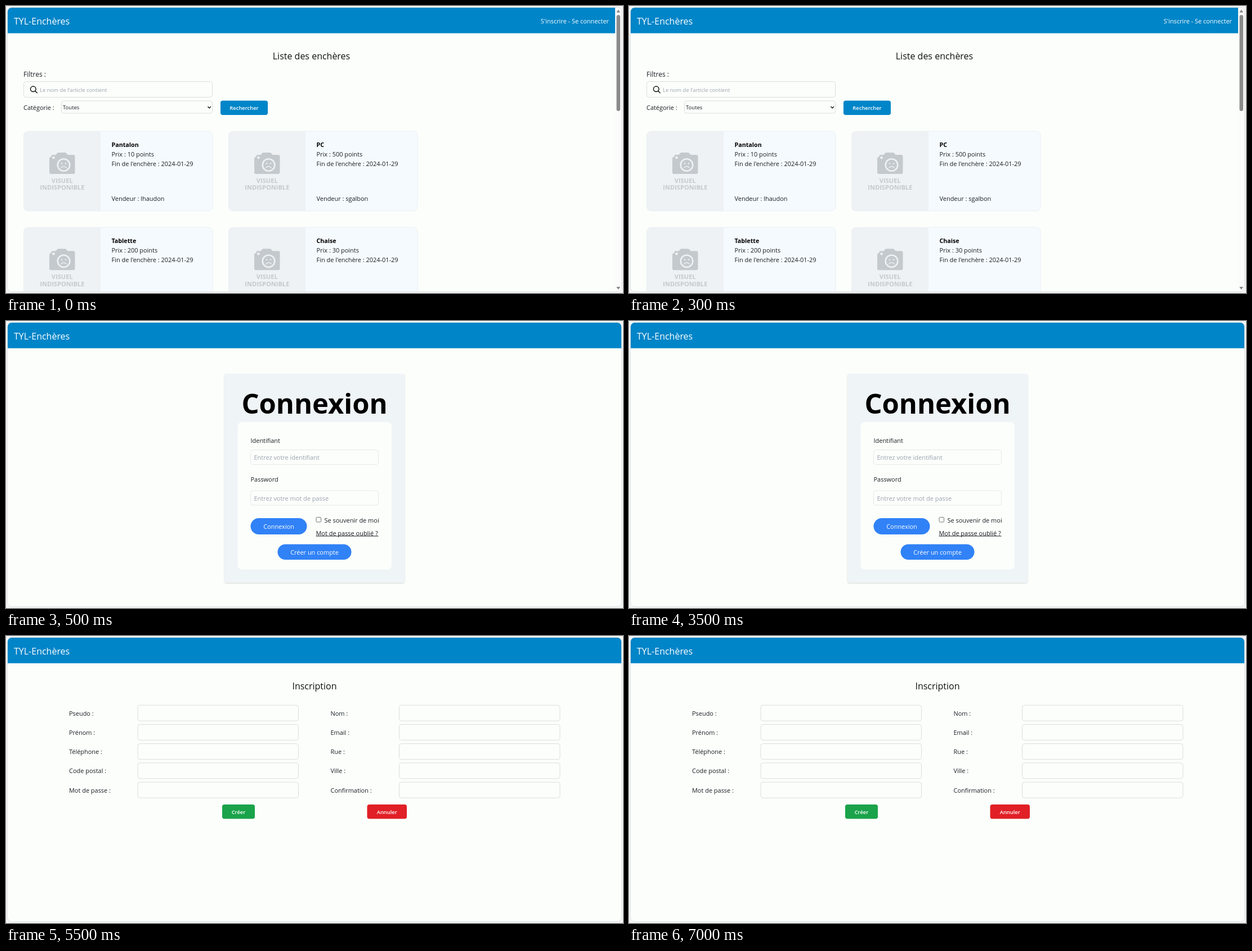
An HTML page that plays this animation: 1096 by 511 pixels, repeating every 8000 ms.

```html
<!DOCTYPE html>
<html lang="fr">
<head>
<meta charset="utf-8">
<title>Enchères</title>
<style>
  html, body { margin: 0; width: 100%; height: 100%; overflow: hidden; background: #f4f5f5; }
  svg { display: block; width: 1096px; height: 511px; }
  text { font-family: "Open Sans", "Noto Sans", sans-serif; font-size: 10.95px; fill: #1b1f24; white-space: pre; }
  .h { font-size: 16px; fill: #111; }
  .b { font-weight: 700; font-size: 10.7px; fill: #000; }
  .s { font-size: 9.5px; }
  .hint { fill: #9ca3af; }
  .btn { font-size: 9.4px; font-weight: 600; fill: #fff; }
  .w { fill: #fff; }
  .mid { text-anchor: middle; }
  .big { font-size: 48.9px; font-weight: 700; fill: #000; }
  .none { font-size: 11.1px; font-weight: 700; fill: #c4c9cd; }
</style>
</head>
<body>
<svg viewBox="0 0 1096 511">
  <defs>
    <clipPath id="win"><rect x="3" y="3" width="1090" height="505" rx="7"/></clipPath>
    <filter id="soft" x="-5%" y="-5%" width="110%" height="110%">
      <feDropShadow dx="0" dy="1" stdDeviation="1" flood-opacity=".16"/>
    </filter>
    <g id="camera">
      <path d="M49 45.500V44q0-2 2-2h6l2.500-3q1-1 2.500-1h11q1.500 0 2.500 1l2.500 3h10q3 0 3 3v28q0 3-3 3H48.500q-3 0-3-3V48.500q0-3 3.500-3z" fill="#c4c9cd"/>
      <circle cx="53" cy="47" r="2.300" fill="#eef2f5"/>
      <circle cx="71" cy="60" r="10.800" fill="#c4c9cd" stroke="#eef2f5" stroke-width="2.600"/>
      <g fill="#eef2f5">
        <circle cx="67.500" cy="57.500" r="1.300"/>
        <circle cx="74.500" cy="57.500" r="1.300"/>
      </g>
      <path d="M66.500 65q4.500-5 9 0" fill="none" stroke="#eef2f5" stroke-width="1.500" stroke-linecap="round"/>
    </g>
  </defs>
  <rect x="2.500" y="2.500" width="1091" height="506" rx="7.500" fill="#fbfefb" stroke="#e0e3e3"/>
  <g clip-path="url(#win)">
    <rect id="bar" x="3" y="3" width="1090" height="45.500" fill="#0085c8"/>
    <text x="14" y="32.500" class="h w" style="fill:#fff">TYL-Enchères</text>
    <g id="list"></g>
    <g id="login"></g>
    <g id="signup"></g>
  </g>
</svg>
<script>
const byId = id => document.getElementById(id);
const text = (x, y, str, cls = "") => `<text x="${x}" y="${y}" class="${cls}">${str}</text>`;
const box = (x, y, w, h, r, fill, more = "") =>
  `<rect x="${x}" y="${y}" width="${w}" height="${h}" rx="${r}" fill="${fill}" ${more}/>`;
const field = (x, y, w, h, line = "#d9dfe0") => box(x, y, w, h, 4, "#fbfefb", `stroke="${line}"`);
const button = (x, y, w, h, r, fill, label, base, cls) =>
  box(x, y, w, h, r, fill) + text(x + w / 2, base, label, cls + " mid");

function card(x, y, name, price, seller) {
  return `<g transform="translate(${x} ${y})">
    ${box(0, 0, 335.5, 142, 8, "#f5fafe")}
    <path d="M136.500 0V142H8q-8 0-8-8V8q0-8 8-8z" fill="#eef2f5"/>
    ${box(0, 0, 335.5, 142, 8, "none", 'stroke="#e9f0f3"')}
    <use href="#camera"/>
    ${text(68.3, 92, "VISUEL", "none mid")}
    ${text(68.3, 104.3, "INDISPONIBLE", "none mid")}
    ${text(156, 27.7, name, "b")}
    ${text(156, 45, `Prix : ${price} points`)}
    ${text(156, 62, "Fin de l'enchère : 2024-01-29")}
    ${text(156, 123.5, "Vendeur : " + seller)}
  </g>`;
}

byId("list").innerHTML =
  `<text x="1071" y="30.500" class="w" text-anchor="end">S'inscrire - Se connecter</text>` +
  text(542.5, 95, "Liste des enchères", "h mid") +
  `<text x="31" y="126" style="font-size:12px">Filtres :</text>` +
  field(31.5, 134.5, 335, 28) +
  `<g fill="none" stroke="#111" stroke-width="1.500" stroke-linecap="round">
    <circle cx="48.300" cy="147.800" r="4.800"/><path d="M51.800 151.300l3.400 3.400"/></g>` +
  text(60, 152.5, "Le nom de l'article contient", "s hint") +
  text(31, 184.8, "Catégorie :") +
  field(98.5, 169, 268, 22) +
  text(101, 184.3, "Toutes", "s") +
  `<path d="M358.500 179l2.700 2.700 2.700-2.700" fill="none" stroke="#111" stroke-width="1.400"/>` +
  button(381, 168.5, 84, 25.5, 4, "#0085c8", "Rechercher", 185.2, "btn") +
  card(31.5, 223, "Pantalon", 10, "lhaudon") +
  card(395.5, 223, "PC", 500, "sgalbon") +
  card(31.5, 394.3, "Tablette", 200, "lhaudon") +
  card(395.5, 394.3, "Chaise", 30, "sgalbon") +
  box(1082, 3, 11, 505, 0, "#fbfbfb") +
  box(1084.5, 16, 6.5, 171, 3.2, "#8a8a8a") +
  `<path d="M1084.300 11.500h6.800l-3.400-5zM1084.300 500h6.800l-3.400 5z" fill="#858585"/>`;

const blue = "#3182f6";
byId("login").innerHTML =
  box(388, 94, 320, 372, 4, "#eff4f7", 'filter="url(#soft)"') +
  text(548, 165, "Connexion", "big mid") +
  box(411.5, 180, 273.5, 262.5, 8, "#fbfefb") +
  text(434.5, 216.5, "Identifiant") +
  field(434.5, 229.5, 227, 26, "#e5e9eb") +
  text(440.5, 247.3, "Entrez votre identifiant", "hint") +
  text(434.5, 286, "Password") +
  field(434.5, 302, 227, 26, "#e5e9eb") +
  text(440.5, 319.8, "Entrez votre mot de passe", "hint") +
  button(434.5, 351, 100, 29, 14.5, blue, "Connexion", 370, "w") +
  box(551, 349.5, 8.5, 8.5, 1.5, "#fff", 'stroke="#767676"') +
  text(565.5, 358.7, "Se souvenir de moi") +
  text(550.5, 381.5, "Mot de passe oublié ?") +
  box(550.5, 382.5, 111, 1, 0, "#1b1f24") +
  button(482.5, 397.5, 131, 27.5, 13.75, blue, "Créer un compte", 415.5, "w");

const rows = [
  ["Pseudo", "Nom"], ["Prénom", "Email"], ["Téléphone", "Rue"],
  ["Code postal", "Ville"], ["Mot de passe", "Confirmation"]
];
byId("signup").innerHTML =
  text(548, 95, "Inscription", "h mid") +
  rows.map((pair, r) => pair.map((label, c) => {
    const x = 112 + c * 464.5, y = 123.2 + r * 34.25;
    return text(x, y + 18.5, label + " :") + field(x + 122, y, 285.5, 28);
  }).join("")).join("") +
  button(384, 300, 58, 25.5, 4, "#1aa34a", "Créer", 316.8, "btn") +
  button(641.5, 300, 70.5, 25.5, 4, "#e02026", "Annuler", 316.8, "btn");

const loop = 8000;
const pages = [["list", 0, 500], ["login", 500, 5500], ["signup", 5500, loop]];
const start = performance.now();

function draw() {
  const t = (performance.now() - start) % loop;
  for (const [id, from, to] of pages)
    byId(id).style.display = t >= from && t < to ? "" : "none";
  byId("bar").setAttribute("width", t < 500 ? 1079 : 1090);
  requestAnimationFrame(draw);
}
draw();
</script>
</body>
</html>
```
